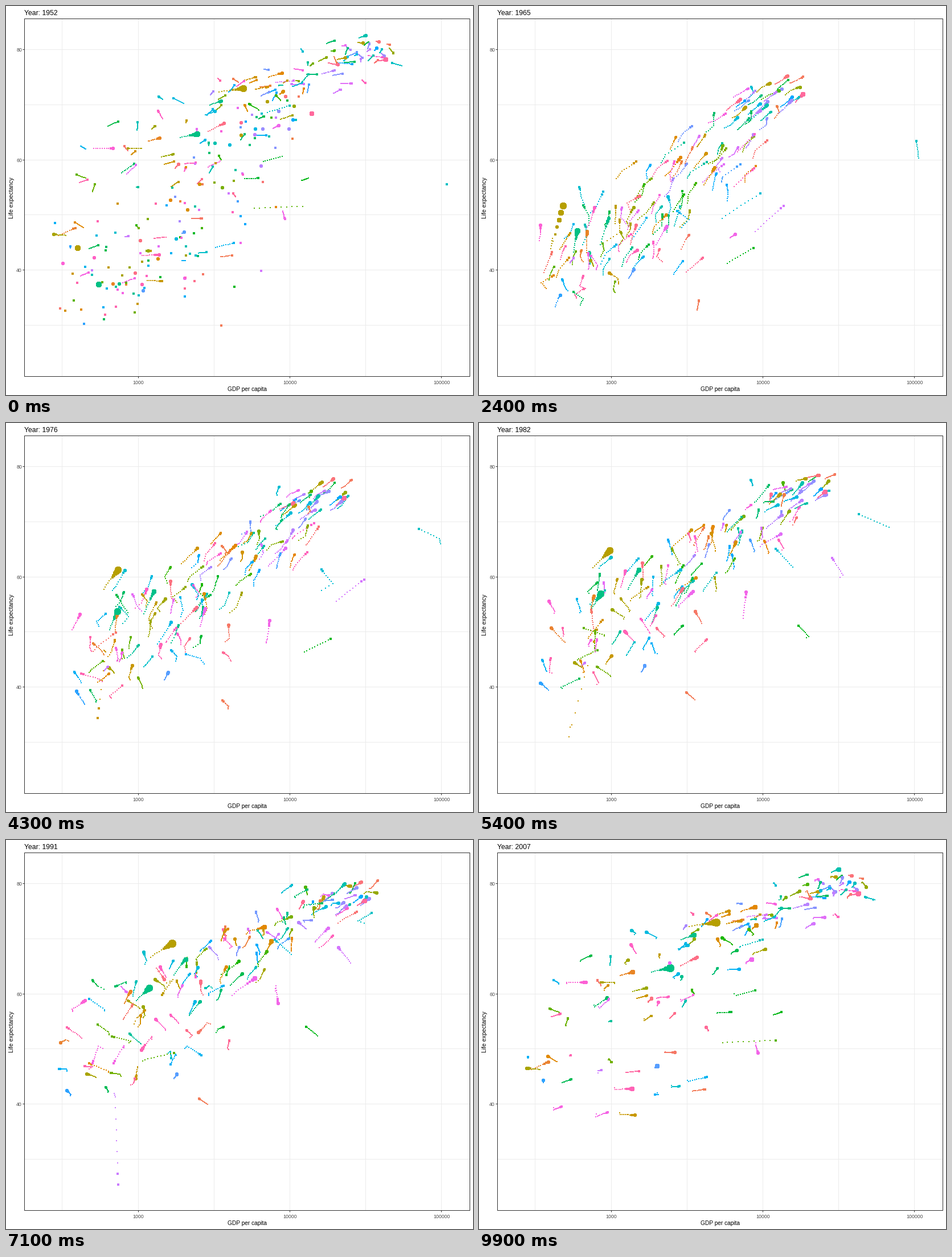
Animation of 820x683 px, one loop 10000 ms. Source, as a matplotlib script:

```python
import numpy as np
import matplotlib.pyplot as plt
from matplotlib.animation import FuncAnimation
from matplotlib.patches import Rectangle

W, H, DPI = 820, 683, 64
PX = 72 / DPI
FRAMES, WAKE, COUNT = 100, 10, 142
YEARS = np.linspace(1952, 2007, FRAMES)
KNOTS = np.arange(1952, 2008, 5)
T = np.linspace(0, 1, len(KNOTS))
rng = np.random.default_rng(11)

plt.rcParams["font.family"] = "Liberation Sans"


def hcl(hue, chroma=100, lum=65):
    """Polar LUV colour to clipped sRGB."""
    a = np.radians(hue)
    y = ((lum + 16) / 116) ** 3
    u = chroma * np.cos(a) / (13 * lum) + 0.1978
    v = chroma * np.sin(a) / (13 * lum) + 0.4683
    x = 9 * y * u / (4 * v)
    z = -x / 3 - 5 * y + 3 * y / v
    lin = np.array([3.2405 * x - 1.5371 * y - 0.4985 * z,
                    -0.9693 * x + 1.8760 * y + 0.0416 * z,
                    0.0556 * x - 0.2040 * y + 1.0573 * z])
    lin = np.clip(lin, 0, 1)
    return np.where(lin <= 0.0031308, 12.92 * lin, 1.055 * lin ** (1 / 2.4) - 0.055)


def px_x(log_gdp):
    return 232.3 + 266.1 * (log_gdp - 3)


def px_y(life):
    return 76.9 + 9.675 * (80 - life)


def blend(ends, t):
    return ends[0] + (ends[1] - ends[0]) * t


def ease_out(power):
    return 1 - (1 - T) ** power


def pulse(year, width):
    return np.maximum(0, 1 - np.abs(KNOTS - year) / width)


xs, ys, size = np.zeros((3, FRAMES, COUNT))
free = set(range(COUNT))


def store(i, log_gdp, life, pop):
    """Move straight between the five-year knots."""
    people = pop[0] * (pop[1] / pop[0]) ** np.linspace(0, 1, FRAMES)
    xs[:, i] = px_x(np.interp(YEARS, KNOTS, log_gdp))
    ys[:, i] = px_y(np.interp(YEARS, KNOTS, life))
    size[:, i] = 1 + 5 * np.sqrt(np.minimum(people / 1318, 1))
    free.discard(i)


def track(i, pop, gdp, life, bend=1.0, bump=(1952, 1, 0, 0)):
    """Eased start-to-end path with one (year, width, log income, life) bump."""
    year, width, d_gdp, d_life = bump
    p = pulse(year, width)
    store(i, blend(np.log10(gdp), T ** bend) + d_gdp * p,
          blend(life, ease_out(1.6)) + d_life * p, pop)


# Large populations
track(24, (556, 1318), (400, 4959), (44, 73), 1.7, (1962, 5, -0.06, -8))
track(58, (372, 1110), (547, 2452), (37.4, 64.7), 2)
track(134, (158, 301), (13990, 42952), (68.4, 78.2))
track(59, (82, 224), (750, 3541), (37.5, 70.7), 1.3)
track(14, (57, 190), (2109, 9066), (50.9, 72.4), 0.4)
track(66, (86, 127), (3217, 31656), (63, 82.6), 0.45)
track(8, (47, 150), (684, 1391), (37.5, 64), 3)
track(94, (33, 135), (1077, 2014), (36.3, 46.9), 0.6)

# Oil booms, wars and epidemics
track(71, (0.2, 2.5), (108382, 47307), (55.6, 77.6), 2, (1987, 15, -0.44, 0))
track(107, (2.5, 9), (493, 863), (40, 46.2), 1, (1992, 6, 0, -22))
track(18, (5, 14), (368, 1714), (39.4, 59.7), 1, (1977, 6, -0.15, -21))
track(45, (0.4, 1.5), (4293, 13206), (37, 56.7), 1, (1977, 20, 0.45, 0))
track(109, (4, 27), (6460, 21655), (39.9, 72.8), 1, (1977, 20, 0.48, 0))
track(75, (1, 6), (2388, 12057), (42.7, 74), 1, (1972, 20, 0.65, 0))
track(3, (4, 12), (3521, 4797), (30, 42.7), 1, (1992, 20, -0.25, 0))
track(40, (0.2, 0.6), (376, 12154), (34.5, 51.6), 2.5)
track(117, (14, 44), (4725, 9270), (45, 49.3), 0.5, (1987, 17, 0, 13))
track(27, (14, 65), (781, 278), (39.1, 46.5), 2)


def region(ids, gdp, gdp_sd, life, life_sd, walk, pop, grow, link=0.8, slump=0.0, dips=0.0):
    """Spread of paths around an eased regional trend."""
    rank = np.linspace(-1.65, 1.65, len(ids))
    wealth, luck = rng.permutation(rank), rng.permutation(rank)
    for i, w, q in zip(ids, wealth, luck):
        drift = np.cumsum(rng.normal(0, walk, len(KNOTS)))
        health = link * w + np.sqrt(1 - link ** 2) * q
        x = blend(gdp, ease_out(1.4)) + blend(gdp_sd, T) * w + drift - drift.mean()
        x -= slump * pulse(1993, 14)
        y = blend(life, ease_out(1.5)) + blend(life_sd, T) * health
        y += rng.normal(0, 0.35, len(KNOTS))
        if rng.random() < dips:
            y -= rng.uniform(8, 16) * np.clip((KNOTS - 1987) / 15, 0, 1)
        people = min(pop * np.exp(rng.normal(0, 1.1)), 60)
        store(i, np.clip(x, 2.45, 4.7), np.clip(y, 28, 82.3), (people, people * grow))


ids = [int(i) for i in rng.permutation(sorted(free))]
africa, americas, asia, west, east = np.split(ids, [44, 67, 92, 112])
region(africa, (2.99, 3.17), (0.24, 0.38), (39.2, 59), (4.8, 8), 0.055, 3, 3.2,
       link=0.5, slump=0.08, dips=0.35)
region(americas, (3.46, 3.93), (0.26, 0.27), (53, 73.8), (9, 3.4), 0.042, 4.5, 2.5,
       slump=0.05)
region(asia, (3.15, 3.77), (0.36, 0.52), (46.5, 71.5), (8.5, 6), 0.045, 7, 2.8)
region(west, (3.86, 4.50), (0.14, 0.09), (67.5, 79.9), (2.7, 0.9), 0.012, 9, 1.3, link=0.6)
region(east, (3.55, 4.08), (0.18, 0.16), (60.5, 75), (4.5, 1.7), 0.03, 7, 1.3, slump=0.13)

colors = np.array([hcl(15 + 360 * i / COUNT) for i in range(COUNT)])

# Stage in pixel units, origin at top left
fig = plt.figure(figsize=(W / DPI, H / DPI), dpi=DPI, facecolor="white")
ax = fig.add_axes([0, 0, 1, 1])
ax.set_xlim(0, W)
ax.set_ylim(H, 0)
ax.axis("off")

LEFT, RIGHT, TOP, BOTTOM = 32.5, 814.5, 22.5, 650.5
DARK, GRID, TICK = "#333333", "#EBEBEB", "#4D4D4D"


def line(x, y, color):
    ax.plot(x, y, color=color, lw=PX, zorder=1, solid_capstyle="butt", snap=False)


def label(x, y, s, px, color="black", **kw):
    return ax.text(x, y, s, fontsize=px * PX, color=color, **{"va": "baseline", **kw})


for k in range(6):
    gx = np.floor(98.9 + 133.1 * k) + 0.5
    gy = np.floor(76.5 + 96.75 * k) + 0.5
    line([gx, gx], [TOP, BOTTOM], GRID)
    line([LEFT, RIGHT], [gy, gy], GRID)
    if k % 2:
        line([gx, gx], [BOTTOM, BOTTOM + 3], DARK)
        label(gx, 663.8, str(10 ** (3 + k // 2)), 8.7, TICK, ha="center")
    elif k < 5:
        line([LEFT - 3, LEFT], [gy, gy], DARK)
        label(28, gy + 3.8, str(80 - 10 * k), 8.7, TICK, ha="right")

ax.add_patch(Rectangle((LEFT, TOP), RIGHT - LEFT, BOTTOM - TOP, fill=False, ec=DARK,
                       lw=PX, zorder=4, snap=False))
label(423.5, 676, "GDP per capita", 10.1, ha="center")
label(15, 336.5, "Life expectancy", 10.4, ha="right", va="center", rotation=90)
title = label(32.5, 16, "", 12.3)

steps = np.arange(WAKE, -1, -1)
fade = (1 - steps / (WAKE + 1)) ** 3
blank = np.zeros(COUNT * len(steps))
dots = ax.scatter(blank, blank, s=1, c=np.tile(colors, (len(steps), 1)), linewidths=0,
                  antialiased=False, zorder=3)


def draw(f):
    past = (f - steps) % FRAMES
    dots.set_offsets(np.round(np.column_stack([xs[past].ravel(), ys[past].ravel()])))
    # Whole-pixel radii: faded dots all end as 2 px squares
    raw = 0.354 + 1.067 * size[past] * fade[:, None]
    radius = np.where(raw < 1.3, 1, np.floor(raw) + 0.8).ravel()
    dots.set_sizes((2 * radius * PX) ** 2)
    title.set_text(f"Year: {round(YEARS[f])}")
    return dots, title


anim = FuncAnimation(fig, draw, frames=FRAMES, interval=100, repeat=True,
                     repeat_delay=0, blit=False)
plt.show()
```
